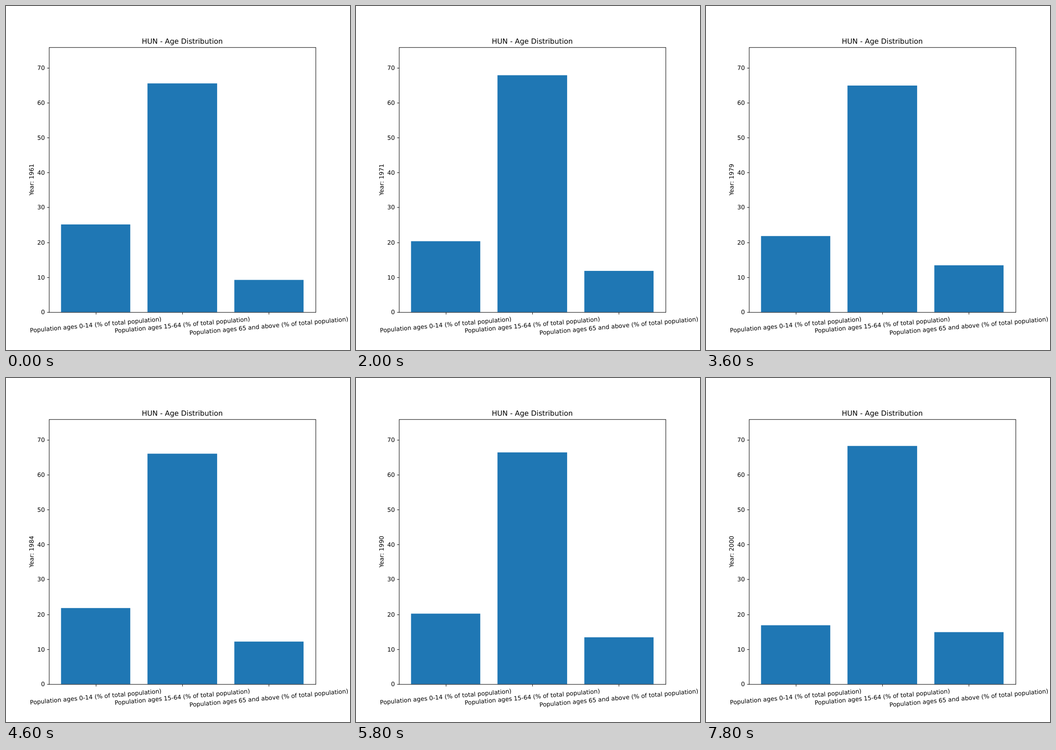
An HTML page with a canvas that plays this animation: 748 px wide and 748 px high, repeating every 8 s.

```html
<!DOCTYPE html>
<html lang="en">
<head>
<meta charset="utf-8">
<title>Age Distribution</title>
<style>
  html, body { margin: 0; width: 100%; height: 100%; overflow: hidden; background: #fff; }
  canvas { display: block; }
</style>
</head>
<body>
<canvas id="chart" width="748" height="748"></canvas>
<script>
const ctx = document.getElementById('chart').getContext('2d');

// The chart is laid out on an 800 px square and scaled to the stage.
const SIZE = 800;
const SCALE = 748 / SIZE;
const FIRST_YEAR = 1961, YEARS = 40, STEP_MS = 200;
const LEFT = 100, RIGHT = 720, TOP = 96, BOTTOM = 712;
const UNIT_Y = 8.12;                     // pixels per percent
const UNIT_X = (RIGHT - LEFT) / 3.08;    // pixels per category
const TICK = 4.86, LABEL_GAP = 9.72;
const LINE_HEIGHT = 14;
const TILT = 5 * Math.PI / 180;

const LABELS = ['0-14', '15-64', '65 and above']
  .map(ages => `Population ages ${ages} (% of total population)`);

// Key points [year, percent]; the middle group is the remainder.
const YOUNG = [[1961, 25.16], [1966, 22.8], [1971, 20.35], [1975, 20.2], [1979, 21.75],
  [1984, 21.78], [1990, 20.2], [1995, 18.15], [2000, 16.87]];
const OLD = [[1961, 9.28], [1966, 10.64], [1973, 12.2], [1979, 13.37],
  [1984, 12.2], [1990, 13.42], [1997, 14.6], [2000, 14.9]];

// Smooth curve through the key points.
function curve(keys, x) {
  const last = keys.length - 1;
  const slope = k => {
    const [xa, ya] = keys[Math.max(k - 1, 0)];
    const [xb, yb] = keys[Math.min(k + 1, last)];
    return (yb - ya) / (xb - xa);
  };
  let k = 0;
  while (k < last - 1 && x >= keys[k + 1][0]) k++;
  const [x0, y0] = keys[k], [x1, y1] = keys[k + 1];
  const h = x1 - x0, t = (x - x0) / h, s = 1 - t;
  return y0 + (y1 - y0) * t * t * (3 - 2 * t) + h * t * s * (s * slope(k) - t * slope(k + 1));
}

const yOf = value => BOTTOM - value * UNIT_Y;
const xOf = index => LEFT + (index + 0.54) * UNIT_X;
const crisp = v => Math.round(v) + 0.5;

function setFont(px) {
  ctx.font = `${px}px "DejaVu Sans", sans-serif`;
}

function line(x1, y1, x2, y2) {
  ctx.beginPath();
  ctx.moveTo(x1, y1);
  ctx.lineTo(x2, y2);
  ctx.stroke();
}

function turnedText(text, x, y, angle, drop) {
  ctx.save();
  ctx.translate(x, y);
  ctx.rotate(-angle);
  ctx.fillText(text, 0, drop);
  ctx.restore();
}

function drawBars(values) {
  ctx.fillStyle = '#1f77b4';
  values.forEach((value, i) => {
    const x1 = Math.round(xOf(i) - 0.4 * UNIT_X);
    const x2 = Math.round(xOf(i) + 0.4 * UNIT_X);
    const y = Math.round(yOf(value));
    ctx.fillRect(x1, y, x2 - x1, BOTTOM - y);
  });
}

function drawAxes() {
  const x1 = crisp(LEFT), x2 = crisp(RIGHT), y1 = crisp(TOP), y2 = crisp(BOTTOM);
  ctx.strokeStyle = ctx.fillStyle = '#000';
  ctx.lineWidth = 1.11;
  setFont(13.889);

  ctx.textAlign = 'right';
  for (let value = 0; value <= 70; value += 10) {
    const y = crisp(yOf(value));
    line(x1 - TICK, y, x1, y);
    ctx.fillText(value, LEFT - LABEL_GAP, y + 4.5);
  }

  ctx.textAlign = 'center';
  LABELS.forEach((label, i) => {
    const x = crisp(xOf(i));
    line(x, y2, x, y2 + TICK);
    const height = ctx.measureText(label).width * Math.sin(TILT) + LINE_HEIGHT * Math.cos(TILT);
    turnedText(label, xOf(i), BOTTOM + LABEL_GAP + height / 2, TILT, 4);
  });

  ctx.strokeRect(x1, y1, x2 - x1, y2 - y1);
}

function drawTitles(year) {
  const midX = (LEFT + RIGHT) / 2, midY = (TOP + BOTTOM) / 2;
  turnedText(`Year: ${year}`, 64, midY, Math.PI / 2, 0);
  setFont(16.667);
  ctx.fillText('HUN - Age Distribution', midX, 88);
}

function draw(time) {
  const year = FIRST_YEAR + Math.floor(time / STEP_MS) % YEARS;
  const young = curve(YOUNG, year), old = curve(OLD, year);
  ctx.fillStyle = '#fff';
  ctx.fillRect(0, 0, SIZE, SIZE);
  drawBars([young, 100 - young - old, old]);
  drawAxes();
  drawTitles(year);
}

function tick() {
  draw(performance.now());
  requestAnimationFrame(tick);
}

ctx.scale(SCALE, SCALE);
ctx.textRendering = 'geometricPrecision';
tick();
</script>
</body>
</html>
```
